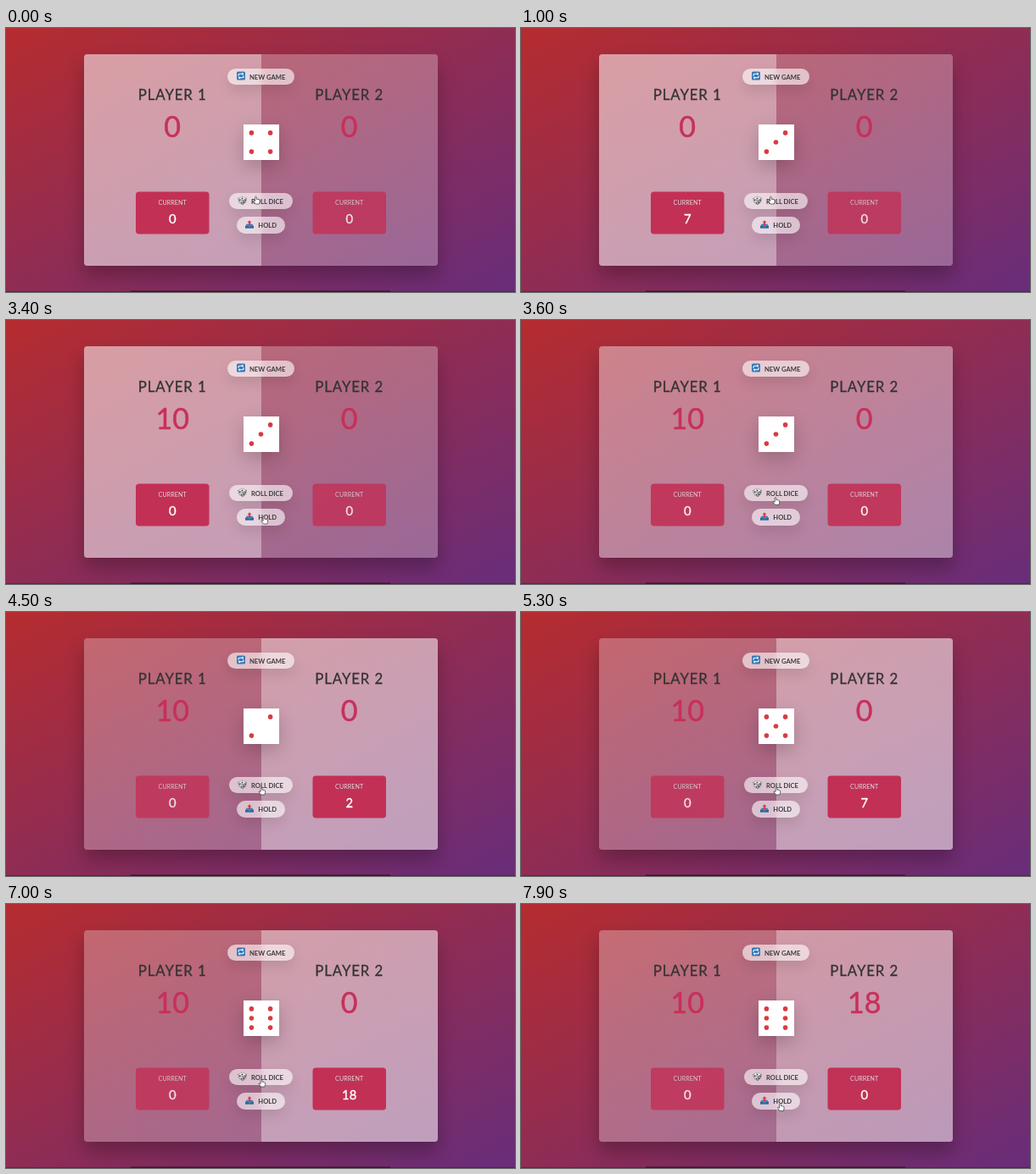
Animation, 600 px wide and 312 px high, one loop 8000 ms. Source, as an HTML page:

```html
<!DOCTYPE html>
<html lang="en">
<head>
<meta charset="utf-8">
<title>Dice game</title>
<style>
  html, body { margin: 0; width: 100%; height: 100%; overflow: hidden; }
  #stage {
    position: relative; width: 600px; height: 312px; overflow: hidden;
    background: linear-gradient(to top left, #682d7a, #b62c2f);
  }
  #stage > * { position: absolute; }
  .card {
    left: 92px; top: 31px; width: 417px; height: 250px; border-radius: 3.75px;
    overflow: hidden; background: rgba(255, 255, 255, .28);
    box-shadow: 0 12.5px 21px rgba(0, 0, 0, .25);
  }
  .panel { position: absolute; top: 0; width: 208.5px; height: 100%; background: #fff; }
  .die {
    left: 279.5px; top: 114px; width: 42px; height: 42px; background: #fff;
    box-shadow: 0 8px 21px rgba(0, 0, 0, .2);
  }
  .button {
    height: 19.5px; border-radius: 10px; background: rgba(255, 255, 255, .6);
    backdrop-filter: blur(4px); box-shadow: 0 7.3px 14.6px rgba(0, 0, 0, .1);
  }
  svg { left: 0; top: 0; font-family: Lato, "Open Sans", sans-serif; }
  .name, .score, .label, .current { text-anchor: middle; }
  .name { font-size: 16.8px; letter-spacing: .9px; fill: #333; stroke: #333; stroke-width: .3px; }
  .score { font-size: 34px; fill: #c7305a; stroke: #c7305a; stroke-width: .5px; }
  .label { font-size: 7.1px; letter-spacing: .1px; fill: #ddd; }
  .current { font-size: 14.8px; fill: #fff; stroke: #fff; stroke-width: .4px; }
  .caption { font-size: 7.6px; font-weight: 700; fill: #3c3a3e; }
</style>
</head>
<body>
<div id="stage">
  <div class="card">
    <div class="panel" style="left:0"></div>
    <div class="panel" style="left:208.5px"></div>
  </div>
  <div class="die"></div>
  <div class="button" style="left:261px;top:47.5px;width:78.5px"></div>
  <div class="button" style="left:263px;top:194.5px;width:74.5px"></div>
  <div class="button" style="left:271.5px;top:223px;width:57.5px"></div>
  <svg width="600" height="312">
    <g id="players"></g>
    <g id="pips" fill="#d93a43"></g>

    <text class="caption" x="287" y="60.5">NEW GAME</text>
    <text class="caption" x="289" y="207.6">ROLL DICE</text>
    <text class="caption" x="297.3" y="236.2">HOLD</text>

    <g transform="translate(272 51.5)">
      <rect width="10" height="10" rx="1.6" fill="#3778b5"/>
      <path d="M2 5.2V4Q2 2.7 3.3 2.7H7M8 4.8V6Q8 7.3 6.7 7.3H3" fill="none" stroke="#fff" stroke-width="1.1"/>
      <path d="M6.3 1.1L8.5 2.7L6.3 4.3ZM3.7 5.7L1.5 7.3L3.7 8.9Z" fill="#fff"/>
    </g>

    <g transform="translate(273.5 199)" stroke="#666" stroke-width=".4">
      <path d="M0 2.5L5 0L10 2.2L5.8 4.8Z" fill="#f4f0f1"/>
      <path d="M0 2.5L5.8 4.8L5.5 10L1.2 7.2Z" fill="#c9c5c8"/>
      <path d="M10 2.2L5.8 4.8L5.5 10L9.2 6.8Z" fill="#9c979c"/>
      <g fill="#333" stroke="none">
        <circle cx="5" cy="2.4" r=".9"/><circle cx="2" cy="4.6" r=".75"/>
        <circle cx="4" cy="7.8" r=".75"/><circle cx="7" cy="7.2" r=".7"/>
        <circle cx="8.7" cy="4.6" r=".7"/>
      </g>
    </g>

    <g transform="translate(282 227)">
      <path d="M1.8 4.5H8.2L10 7V9.5H0V7Z" fill="#4483b8"/>
      <path d="M0 7H3L4 8.2H6L7 7H10V9.5H0Z" fill="#2f659b"/>
      <path d="M5 .2L7.5 3H6V6H4V3H2.5Z" fill="#d63d46"/>
    </g>

    <path id="cursor" fill="#fff" stroke="#333" stroke-width=".7" stroke-linejoin="round"
      d="M-.9 .6Q0 -.5 .8 .6V3.3L2 3.2L3.3 3.6L4.6 4.2V6.6L3.8 9H-.4L-2.9 5.8Q-3.2 4.6 -2 4.8L-.9 5.7Z"/>
    <rect y="311" width="600" height="1" fill="#3a1430" opacity=".5"/>
    <rect x="147" y="310.4" width="306" height="1.6" fill="#35101f" opacity=".75"/>
  </svg>
</div>
<script>
const LOOP = 8000, FADE = 750;
const CENTERS = [196.2, 404.7];

// Each event: time, then the values that change.
const events = [
  { at: 0, die: 4, current: [0, 0], score: [0, 0] },
  { at: 100, current: [4, 0] },
  { at: 700, die: 3, current: [7, 0] },
  { at: 1700, current: [10, 0] },
  { at: 3380, current: [0, 0], score: [10, 0] },
  { at: 4250, die: 2, current: [0, 2] },
  { at: 5100, die: 5, current: [0, 7] },
  { at: 5900, current: [0, 12] },
  { at: 6800, die: 6, current: [0, 18] },
  { at: 7830, current: [0, 0], score: [10, 18] }
];
const switches = [3380, 7830];

// Cursor tip: time, x, y
const path = [
  [0, 294.5, 199], [2600, 294.5, 199], [3100, 304, 232], [3400, 304, 232],
  [3620, 300, 209], [3800, 301, 207], [7000, 301, 207], [7600, 305.5, 235.5], [LOOP, 305.5, 235.5]
];

const $ = selector => document.querySelector(selector);
const clamp = v => Math.min(1, Math.max(0, v));
const mix = (a, b, k) => a + (b - a) * k;

// The CSS "ease" curve, cubic-bezier(.25, .1, .25, 1)
function ease(x) {
  const curve = (u, a, b) => 3 * u * (1 - u) ** 2 * a + 3 * u * u * (1 - u) * b + u ** 3;
  let low = 0, high = 1;
  for (let i = 0; i < 20; i++) {
    const mid = (low + high) / 2;
    if (curve(mid, .25, .25) < x) low = mid; else high = mid;
  }
  return curve(low, .1, 1);
}

$('#players').innerHTML = CENTERS.map((x, i) => `
  <text class="name" x="${x}" y="85">PLAYER ${i + 1}</text>
  <text class="score" x="${x}" y="129.3"></text>
  <g class="box">
    <rect x="${x - 43.2}" y="193.5" width="86.5" height="50" rx="3.75" fill="#c23056"/>
    <text class="label" x="${x}" y="209">CURRENT</text>
    <text class="current" x="${x}" y="230.6"></text>
  </g>`).join('');

const all = selector => [...document.querySelectorAll(selector)];
const panels = all('.panel'), boxes = all('.box');
const scores = all('.score'), currents = all('.current');

function pipsFor(n) {
  const spots = [];
  if (n % 2) spots.push([0, 0]);
  if (n > 1) spots.push([-1, 1], [1, -1]);
  if (n > 3) spots.push([-1, -1], [1, 1]);
  if (n === 6) spots.push([-1, 0], [1, 0]);
  return spots.map(([x, y]) =>
    `<circle cx="${300.5 + x * 11.1}" cy="${135 + y * 11.1}" r="2.8"/>`).join('');
}

function cursorAt(t) {
  const i = path.findIndex(p => p[0] > t);
  const [t0, x0, y0] = path[i - 1], [t1, x1, y1] = path[i];
  const k = (t - t0) / (t1 - t0), s = k * k * (3 - 2 * k);
  return [mix(x0, x1, s), mix(y0, y1, s)];
}

let shownDie;
function draw(t) {
  const state = Object.assign({}, ...events.filter(e => e.at <= t));
  const [toRight, toLeft] = switches.map(at => ease(clamp((t - at) / FADE)));
  const right = toRight - toLeft;

  [1 - right, right].forEach((active, i) => {
    panels[i].style.opacity = .36 * active;
    boxes[i].setAttribute('opacity', mix(.8, 1, active));
    scores[i].textContent = state.score[i];
    currents[i].textContent = state.current[i];
  });
  if (state.die !== shownDie) $('#pips').innerHTML = pipsFor(shownDie = state.die);
  $('#cursor').setAttribute('transform', `translate(${cursorAt(t)})`);
}

const start = performance.now();
function frame() {
  draw((performance.now() - start) % LOOP);
  requestAnimationFrame(frame);
}
frame();
</script>
</body>
</html>
```
